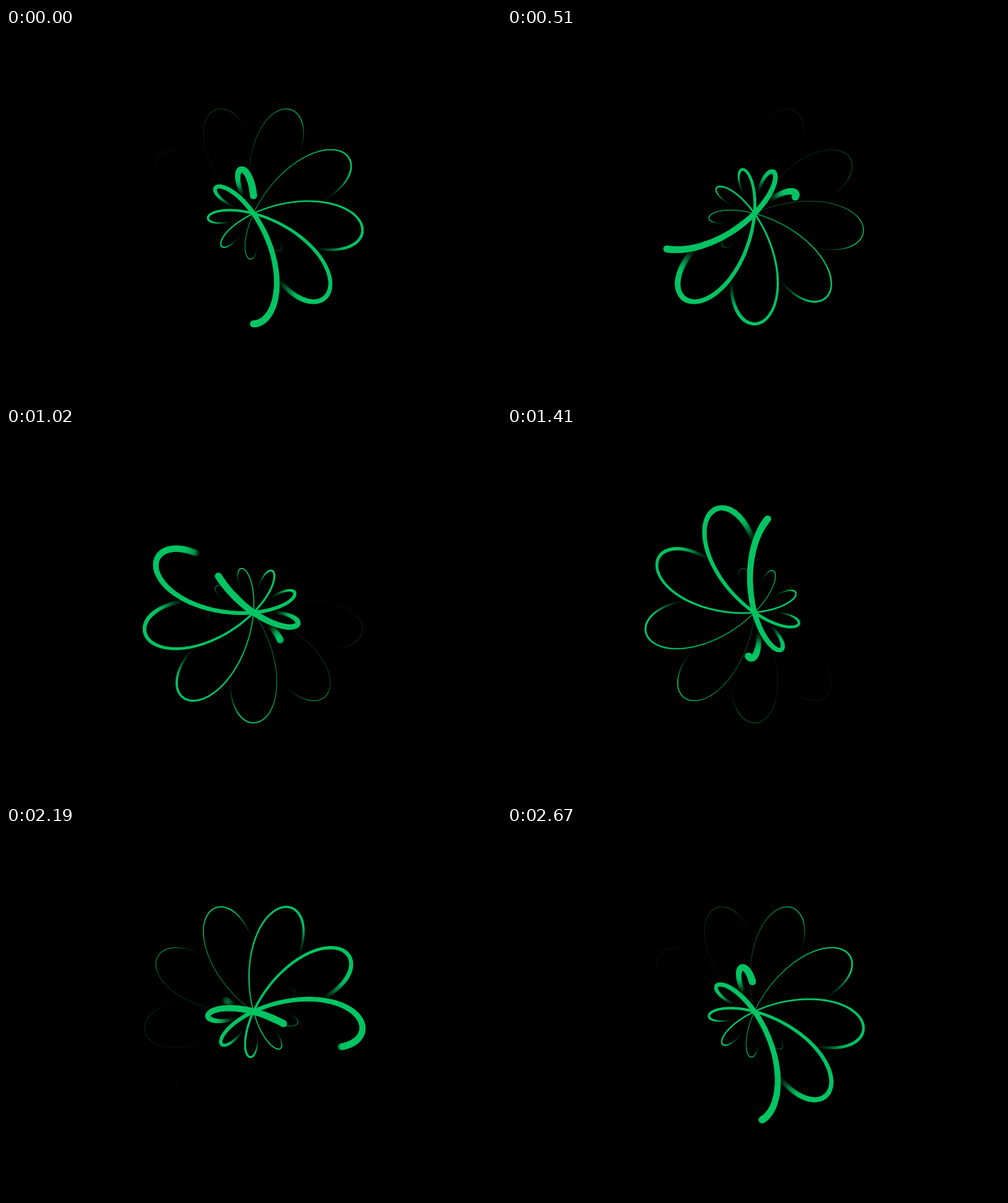
Animation of 800 by 600 pixels, one loop 2700 ms. Source, as an HTML page with a canvas:

```html
<!DOCTYPE html>
<html lang="en">
<head>
<meta charset="utf-8">
<title>Petal trails</title>
<style>
  html, body { margin: 0; width: 100%; height: 100%; overflow: hidden; background: #000; }
  canvas { display: block; width: 800px; height: 600px; }
</style>
</head>
<body>
<canvas id="stage" width="800" height="600"></canvas>
<script>
const ctx = document.getElementById('stage').getContext('2d');
const LOOP = 2700, STROKES = 9, GAP = LOOP / STROKES, TICK = 30;
const COLOR = '#02c463';
const START = -544, END = 154, STEP = 2, FADE = 95;
const TAU = Math.PI * 2;

// Signed distance from the centre; u = ms relative to the outer tip
function reach(u) {
  const x = Math.PI * u / 420;
  return 52.25 + 127.75 * Math.cos(x) - 1.5 * Math.cos(3 * x);
}

// Strokes fade in on the small petal and out on the large one
function opacity(u) {
  const edge = Math.min(u + 545, 155 - u) / FADE;
  return Math.min(1, edge) ** 2;
}

const diameter = age => 11.8 * Math.exp(-age / 600) - 0.25;

const dots = [];
for (let k = 0; k < STROKES; k++) {
  for (let u = START; u <= END; u += STEP) {
    const angle = Math.PI + TAU * (k / STROKES + u / LOOP);
    const r = reach(u);
    dots.push({
      x: 400 + r * Math.sin(angle),
      y: 300 - r * Math.cos(angle),
      born: k * GAP + u,
      alpha: opacity(u)
    });
  }
}

function draw(t) {
  ctx.globalAlpha = 1;
  ctx.fillStyle = '#000';
  ctx.fillRect(0, 0, 800, 600);
  ctx.fillStyle = COLOR;
  for (const dot of dots) {
    const age = (t - dot.born + 2 * LOOP) % LOOP;
    const d = diameter(age);
    if (d < 0.1) continue;
    ctx.globalAlpha = dot.alpha;
    ctx.beginPath();
    ctx.arc(dot.x, dot.y, d / 2, 0, TAU);
    ctx.fill();
  }
}

const begin = performance.now();
let shown = -1;
function frame() {
  const elapsed = Math.max(0, performance.now() - begin) % LOOP;
  const t = Math.floor(elapsed / TICK) * TICK;
  if (t !== shown) draw(shown = t);
  requestAnimationFrame(frame);
}
frame();
</script>
</body>
</html>
```
